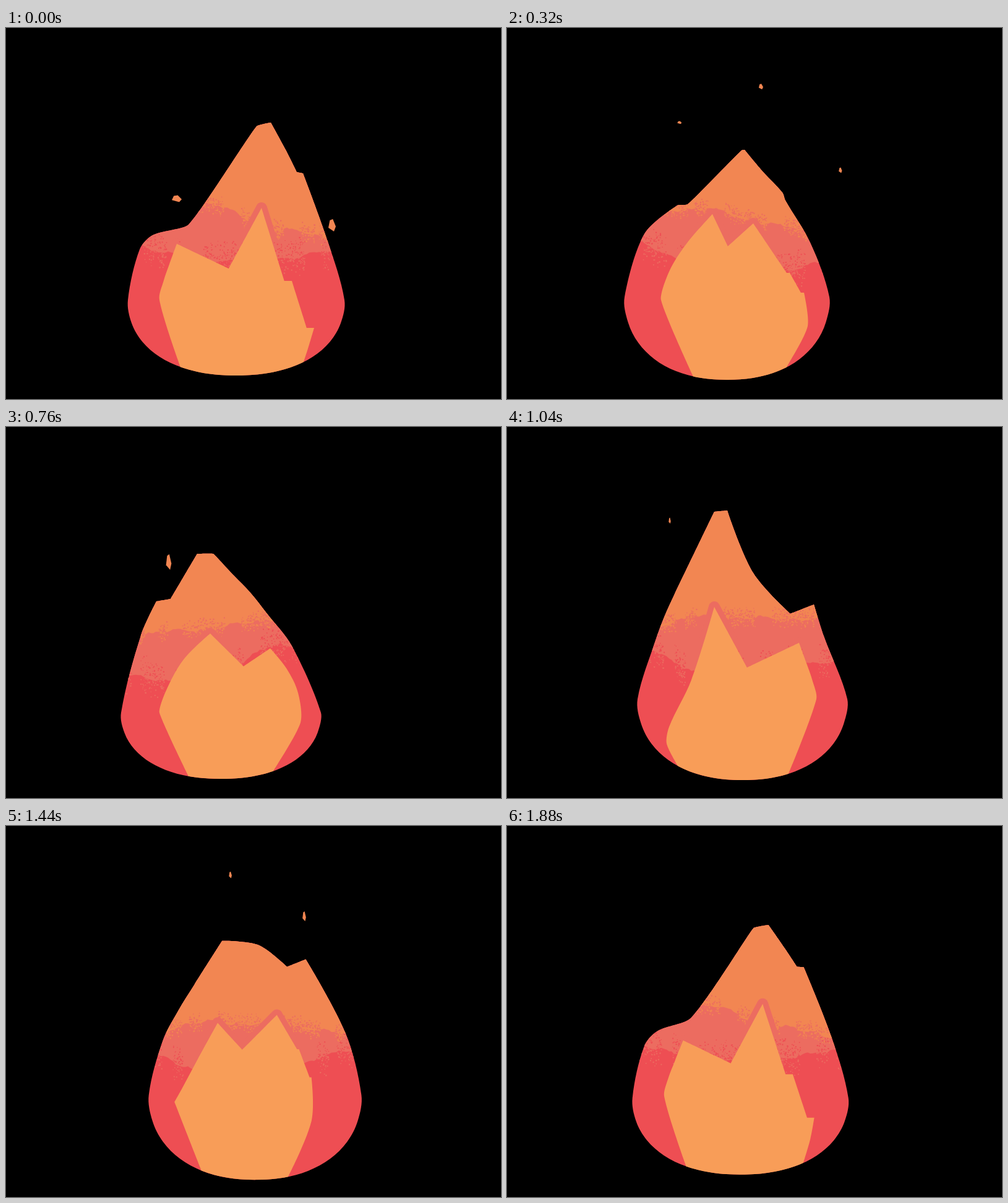
Animation, 800 px wide and 600 px high, one loop 1920 ms. Source, as an HTML page with a canvas:

```html
<!DOCTYPE html>
<html lang="en">
<head>
<meta charset="utf-8">
<title>Flame</title>
<style>
  html, body { margin: 0; width: 100%; height: 100%; overflow: hidden; background: #000; }
  canvas { display: block; width: 800px; height: 600px; }
</style>
</head>
<body>
<canvas id="stage" width="800" height="600"></canvas>
<script>
const ctx = document.getElementById('stage').getContext('2d');
const LOOP = 1920, TICK = 40;
const ORANGE = '#f28652', CORAL = '#ec6c60', RED = '#ee4e53', CORE = '#f89d58';

// Ticks that keep the previous drawing
const HELD = [2, 6, 10, 14, 18, 20, 24, 28, 31, 34, 37, 40];

const points = text => text.split(' ').map(pair => pair.split(',').map(Number));
const mirror = (list, axis) => list.map(([x, y]) => [2 * axis - x, y]).reverse();

// hull:  left, right, height of the widest part, bottom
// crown: left shoulder, lick, notch, two tip corners, slope, notch, lick, right shoulder
// core:  left side, two steps, tip, valley, tip, two steps, right side
// foot:  x of the core's bottom corners; ledge: width of its steps, left and right
// warm, hot: heights of the colour bands at even steps from x = 200 to 560
const tall = points('248,440 255,408 264,382 276,349 360,389 413,291 450,409 486,485 490,512');
const poses = [
  {
    time: 0, hull: [197, 547, 440, 562],
    crown: points('216,358 237,335 295,318 405,159 428,153 452,197 470,233 480,235 520,345'),
    core: tall, foot: [282, 481], ledge: [0, 12],
    warm: [280, 282, 325, 340], hot: [348, 375, 370, 358],
  },
  {
    time: 320, hull: [190, 521, 435, 569],
    crown: points('222,333 275,287 292,285 379,198 384,197 415,234 445,266 450,279 490,347'),
    core: points('249,440 262,394 290,349 332,301 357,353 398,316 452,396 475,428 486,482'),
    foot: [301, 452], ledge: [0, 5],
    warm: [290, 292, 318, 350], hot: [342, 388, 390, 370],
  },
  {
    time: 760, hull: [186, 509, 462, 569],
    crown: points('218,337 243,282 266,278 309,205 335,205 368,240 395,268 422,302 462,354'),
    core: points('248,462 258,428 287,376 330,334 384,387 427,358 453,390 472,430 476,478'),
    foot: [295, 432], ledge: [0, 0],
    warm: [335, 325, 308, 320], hot: [400, 420, 350, 350],
  },
  {
    time: 1040, hull: [211, 550, 440, 571],
    crown: points('240,345 255,305 270,272 335,137 356,135 398,236 458,302 496,287 512,338'),
    core: mirror(tall, 374), foot: [276, 455], ledge: [12, 0],
    warm: [325, 306, 308, 310], hot: [345, 400, 385, 378],
  },
  {
    time: 1320, hull: [227, 571, 433, 571],
    crown: points('253,345 280,289 300,252 344,176 362,177 400,189 451,248 489,232 545,338'),
    core: points('261,459 277,439 305,386 345,309 388,367 452,328 481,364 497,415 495,480'),
    foot: [304, 450], ledge: [0, 0],
    warm: [340, 310, 318, 328], hot: [355, 400, 400, 350],
  },
  {
    time: 1640, hull: [237, 580, 438, 574],
    crown: points('254,351 276,314 312,264 358,202 390,202 430,202 460,194 477,188 554,328'),
    core: points('291,425 297,400 318,362 337,334 372,353 414,268 453,356 480,392 492,470'),
    foot: [336, 466], ledge: [0, 8],
    warm: [340, 326, 322, 348], hot: [352, 390, 390, 375],
  },
];
poses.push({ ...poses[0], time: LOOP });

// start, x, y, rise, drift, width, height
const SPARKS = [
  [0, 276, 276, 177, 4, 16, 11],
  [0, 527, 319, 128, 17, 12, 20],
  [120, 420, 136, 95, -22, 11, 14],
  [640, 263, 247, 110, 0, 11, 32],
  [1160, 359, 146, 110, 6, 9, 21],
  [1160, 482, 213, 110, 0, 11, 31],
];
const SPARK_LIFE = 460;

const mix = (a, b, k) => Array.isArray(a) ? a.map((v, i) => mix(v, b[i], k)) : a + (b - a) * k;

function poseAt(t) {
  const i = poses.findIndex(p => p.time > t);
  const a = poses[i - 1], b = poses[i];
  const k = (t - a.time) / (b.time - a.time);
  return Object.fromEntries(Object.keys(a).map(key => [key, mix(a[key], b[key], k)]));
}

// Rounded bowl under the flame
function bowlY([left, right, waist, floor], x) {
  const u = Math.min(1, Math.abs(2 * x - left - right) / (right - left));
  return waist + (floor - waist) * (1 - u ** 2.2) ** (1 / 2.2);
}

function bowl(hull, from, to) {
  const list = [];
  for (let i = 0; i <= 12; i++) {
    const x = (from + to) / 2 + (from - to) / 2 * Math.cos(Math.PI * i / 12);
    list.push([x, bowlY(hull, x)]);
  }
  return list;
}

function bodyPoints({ hull, crown }) {
  return [...crown, ...bowl(hull, hull[1], hull[0])];
}

function corePoints({ hull, core, foot, ledge }) {
  const step = ([x, y], width) => width < 1 ? [[x, y]] : [[x, y], [x + width, y]];
  const [side, low, high, ...rest] = core;
  const [tipL, valley, tipR, highR, lowR, sideR] = rest;
  return [
    side, ...step(low, ledge[0] && -ledge[0]).reverse(), ...step(high, ledge[0] && -ledge[0]).reverse(),
    tipL, valley, tipR, ...step(highR, ledge[1]), ...step(lowR, ledge[1]), sideR,
    ...bowl(hull, foot[1], foot[0]),
  ];
}

// Closed curve through the points: shallow turns are smooth, sharp ones stay corners.
function outline(list) {
  const n = list.length, at = i => list[(i + n) % n];
  const handles = list.map(([x, y], i) => {
    const [px, py] = at(i - 1), [qx, qy] = at(i + 1);
    const before = Math.hypot(x - px, y - py), after = Math.hypot(qx - x, qy - y);
    const cos = ((x - px) * (qx - x) + (y - py) * (qy - y)) / (before * after || 1);
    const soft = Math.min(1, Math.max(0, (cos - 0.65) / 0.25));
    const span = Math.hypot(qx - px, qy - py) || 1;
    const dx = (qx - px) / span * soft / 3, dy = (qy - py) / span * soft / 3;
    return [x - dx * before, y - dy * before, x + dx * after, y + dy * after];
  });
  const path = new Path2D();
  path.moveTo(...at(0));
  handles.forEach((h, i) => {
    const next = handles[(i + 1) % n];
    path.bezierCurveTo(h[2], h[3], next[0], next[1], ...at(i + 1));
  });
  path.closePath();
  return path;
}

function random(seed) {
  return () => (seed = (seed * 16807) % 2147483647) / 2147483647;
}

function bandY(band, x) {
  const u = Math.min(2.999, Math.max(0, (x - 200) / 120)), i = Math.floor(u), f = u - i;
  return mix(band[i], band[i + 1], f * f * (3 - 2 * f));
}

// Fills everything above the band's edge and grains the edge like dry paint.
function paintBand(band, above, below, spread, rnd) {
  const phase = rnd() * 6;
  const patch = x => Math.sin(x / 17 + phase) + Math.sin(x / 7.3 + phase * 2);
  ctx.fillStyle = above;
  ctx.beginPath();
  ctx.moveTo(150, 0);
  for (let x = 150; x <= 630; x += 4) ctx.lineTo(x, bandY(band, x) + patch(x) * 2 + rnd() * 3);
  ctx.lineTo(630, 0);
  ctx.fill();
  for (let i = 0; i < 1300; i++) {
    const x = 180 + rnd() * 410, d = (rnd() + rnd() - 1) * spread, size = 1 + rnd() * 1.2;
    if (patch(x) < -0.4) continue;
    ctx.fillStyle = d > 0 ? above : below;
    ctx.fillRect(x, bandY(band, x) + d, size, size);
  }
}

// Coral glow around the tips of the core
function paintGlow(path) {
  ctx.save();
  ctx.beginPath();
  ctx.rect(0, 0, 800, 345);
  ctx.clip();
  ctx.strokeStyle = CORAL;
  ctx.lineWidth = 18;
  ctx.lineJoin = 'round';
  ctx.stroke(path);
  ctx.restore();
}

function drawSpark([start, x, y, rise, drift, w, h], t) {
  const k = (t - start) / SPARK_LIFE;
  if (k < 0 || k >= 1) return;
  const size = (1 - 0.8 * k) / 2;
  ctx.beginPath();
  for (const [u, v] of [[-1, 0.4], [-0.6, -0.8], [0.2, -1], [1, 0.2], [0.5, 1]]) {
    ctx.lineTo(x + drift * k + u * w * size, y - rise * k + v * h * size);
  }
  ctx.fillStyle = ORANGE;
  ctx.fill();
}

function draw(t) {
  const pose = poseAt(t);
  const core = outline(corePoints(pose));
  const rnd = random(1000 + t * 7);
  ctx.fillStyle = '#000';
  ctx.fillRect(0, 0, 800, 600);

  ctx.save();
  ctx.clip(outline(bodyPoints(pose)));
  ctx.fillStyle = RED;
  ctx.fillRect(0, 0, 800, 600);
  paintBand(pose.hot, CORAL, RED, 34, rnd);
  paintBand(pose.warm, ORANGE, CORAL, 18, rnd);
  paintGlow(core);
  ctx.restore();

  ctx.fillStyle = CORE;
  ctx.fill(core);
  for (const spark of SPARKS) drawSpark(spark, t);
}

let begin = null, shown = -1;
function frame(now) {
  if (begin === null) begin = now;
  let tick = Math.floor(((now - begin) % LOOP) / TICK);
  if (HELD.includes(tick)) tick--;
  if (tick !== shown) draw((shown = tick) * TICK);
  requestAnimationFrame(frame);
}
draw(0);
requestAnimationFrame(frame);
</script>
</body>
</html>
```
